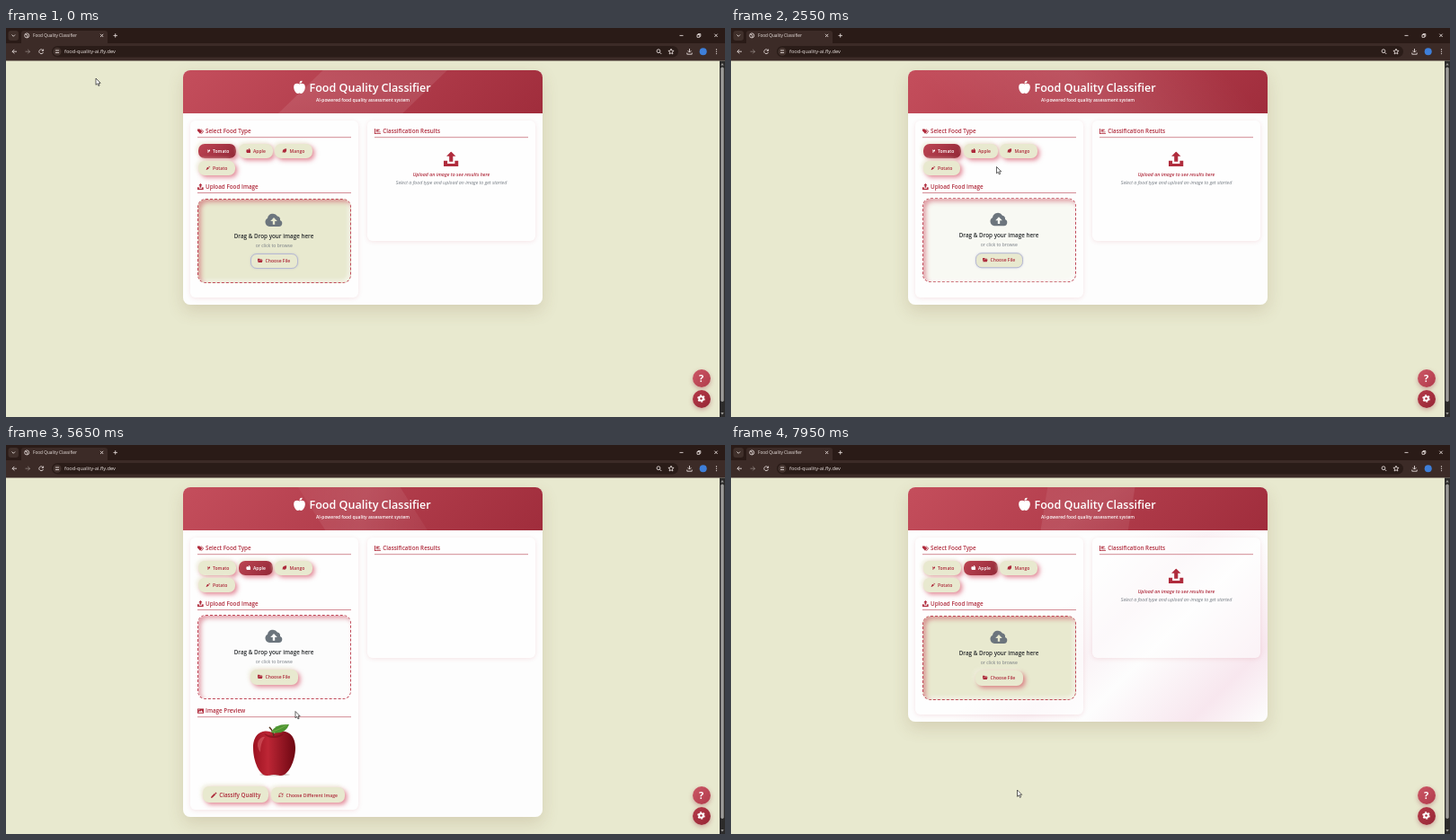
Write an HTML page that moves like this. It is 800 px wide and 433 px high and loops after 8 s.

```html
<!DOCTYPE html>
<html lang="en">
<head>
<meta charset="utf-8">
<title>Food Quality Classifier</title>
<style>
html, body { margin: 0; width: 100%; height: 100%; overflow: hidden; background: #e8e9cf; }
body { position: relative; font: 600 5.05px "Open Sans", "Noto Sans", sans-serif; }
div, .ink { position: absolute; box-sizing: border-box; }
.ink { left: 0; top: 0; width: 800px; height: 433px; overflow: visible; }
#panel { left: 197px; top: 47px; width: 400px; border-radius: 8px; background: #fdfdfd; overflow: hidden; }
#panelShadow { left: 197px; top: 47px; width: 400px; border-radius: 8px; box-shadow: 0 7px 18px rgba(120,85,50,.17); }
#header { left: 0; top: 0; width: 400px; height: 48px; overflow: hidden; background: linear-gradient(135deg, #c44e5c, #a02d3c); }
#shine { left: -200px; top: -24px; width: 800px; height: 96px;
  background: linear-gradient(45deg, transparent 30%, rgba(255,255,255,.1) 50%, transparent 70%); }
#blush { left: 0; top: 48px; width: 400px; bottom: 0;
  background: linear-gradient(135deg, transparent 42%, rgba(235,190,210,.16) 55%, transparent 66%, rgba(235,180,205,.3) 86%, transparent); }
.card { top: 103px; width: 187px; border-radius: 6px; background: rgba(255,255,255,.5); box-shadow: 0 1px 5px rgba(190,60,80,.13); }
.btn { display: flex; align-items: center; justify-content: center; gap: 2.6px; white-space: nowrap;
  color: #ad2a3b; background: #e8e9cf; border-radius: 7px;
  box-shadow: 2.5px 2.5px 5px rgba(205,50,75,.55), -2px -2px 4px rgba(240,240,222,.9); }
.btn svg { width: 5.8px; height: 5.8px; flex: none; }
.btn.on { color: #fff; background: linear-gradient(135deg, #bd4553, #922736); }
.btn.focus { border: 1px solid #b7b9d2; box-shadow: 0 0 2px rgba(150,155,205,.5); }
#drop { left: 213px; top: 189.5px; width: 171px; height: 94px; border-radius: 9px; border: 1.5px dashed #c04a59;
  box-shadow: inset 3px 3px 5px rgba(200,65,85,.48), inset -2px -2px 4px rgba(255,255,255,.65); }
.round { left: 763.5px; width: 20px; height: 20px; border-radius: 50%; box-shadow: 0 2px 5px rgba(150,40,60,.35); }
.red { fill: #b02c3d; color: #b02c3d; }
.head { font-size: 6.3px; }
.mid { text-anchor: middle; }
.bar { fill: #ecedf1; }
.line { fill: none; stroke: #e2d9d6; stroke-width: .9; }
</style>
</head>
<body>
<svg width="0" height="0" style="position:absolute">
  <defs>
    <symbol id="apple" viewBox="0 0 16 16"><path d="M8 4.5C10 3.2 15 3 15 8c0 4-3 8-5 8-1 0-1-.6-2-.6S7 16 6 16C4 16 1 12 1 8c0-5 5-4.8 7-3.5zM8 3.5C8 1 9.500 0 11.500 0c0 2-1 3.500-3.500 3.500z"/></symbol>
    <symbol id="sprout" viewBox="0 0 16 16"><path d="M0 2c5 0 7 2 7 6v6h2v-4c4 0 7-3 7-7-4 0-6 1-7 4C8 4 5 2 0 2z"/></symbol>
    <symbol id="leaf" viewBox="0 0 16 16"><path d="M2 9C2 4 6 2 14 1c1 7-1 12-6 12-2 0-3-.5-4-1l-2 2z"/></symbol>
    <symbol id="carrot" viewBox="0 0 16 16"><path d="M1 15L5 6c3-2 6 1 5 4zM10 5l1-4 1 3h3l-4 3z"/></symbol>
    <symbol id="tags" viewBox="0 0 16 16"><path d="M0 2h6l6 6-5 6-7-7zM8 2l6 6-5 6h2l5-6-6-6z"/></symbol>
    <symbol id="upload" viewBox="0 0 16 16"><path d="M8 0l5 5h-3v6H6V5H3zM0 10h4v3h8v-3h4v6H0z"/></symbol>
    <symbol id="chart" viewBox="0 0 16 16"><path d="M0 1h2v12h14v2H0zM4 3h9v2H4zM4 6h6v2H4zM4 9h11v2H4z"/></symbol>
    <symbol id="folder" viewBox="0 0 16 16"><path d="M0 2h6l2 2h6v2H4l-3 6H0zM4.500 7H16l-3 7H1z"/></symbol>
    <symbol id="image" viewBox="0 0 16 16"><path fill-rule="evenodd" d="M0 2h16v12H0zM2 12h12l-4-6-3 4-2-2zM4 4a1.300 1.300 0 1 0 .1 0z"/></symbol>
    <symbol id="pencil" viewBox="0 0 16 16"><path d="M0 16l1-4 8-8 3 3-8 8zM10 3l2-2 3 3-2 2z"/></symbol>
    <symbol id="sync" viewBox="0 0 16 16"><path d="M2 7a6 6 0 0 1 10.500-3M14 9a6 6 0 0 1-10.500 3" fill="none" stroke="currentColor" stroke-width="2"/><path d="M15 1v6H9zM1 15V9h6z"/></symbol>
    <linearGradient id="skin"><stop stop-color="#9c1220"/><stop offset=".35" stop-color="#bd2635"/><stop offset="1" stop-color="#6d0712"/></linearGradient>
  </defs>
</svg>

<svg class="ink" id="browser">
  <path fill="#2a1b17" d="M0 0h800v18H0z"/>
  <path fill="#3c2b27" d="M0 17h800v19.500H0zM17 17V6q0-3 3-3h90q3 0 3 3v11z"/>
  <rect x="2.500" y="3" width="11.500" height="11" rx="3" fill="#40302b"/>
  <rect x="51" y="20" width="697" height="12.500" rx="6.200" fill="#2a1c18"/>
  <circle cx="57" cy="26.200" r="4.500" fill="#44342f"/>
  <g class="line">
    <path d="M6.500 7.500l1.800 1.800 1.800-1.800M105 6.800l3.200 3.200m0-3.200l-3.200 3.200M119.500 8.400h4.400m-2.200-2.200v4.400"/>
    <circle cx="23.200" cy="8.400" r="2.500"/><path d="M21.500 7l2.500 1.300-.5 2"/>
    <path d="M12 26.200H7m2.300-2.300L7 26.200l2.300 2.300M41.300 25a2.400 2.400 0 1 0 .2 2M41.600 23.600v1.800h-1.800M55 25h4m-4 2.500h4"/>
    <path opacity=".45" d="M21.500 26.200h5m-2.300-2.300l2.300 2.300-2.300 2.300"/>
    <circle cx="726" cy="25.700" r="1.900"/><path d="M727.500 27.200l1.800 1.800"/>
    <path d="M740 23.200l.9 2 2.200.2-1.700 1.400.5 2.200-1.900-1.200-1.900 1.200.5-2.200-1.700-1.400 2.200-.2z"/>
    <path d="M760.500 23v4m-1.900-1.800l1.900 1.900 1.900-1.900M757.800 27.500v1.700h5.400v-1.700"/>
    <path id="controls" d="M749.500 8.400h4M769 7.500h2.800v2.800H769zM770 7.500v-1h2.800v2.800h-1M788.300 6.600l3.400 3.400m0-3.400l-3.400 3.400"/>
  </g>
  <circle cx="775.700" cy="26.200" r="4" fill="#3e7fd9"/>
  <g fill="#e2d9d6"><circle cx="790.500" cy="24" r=".65"/><circle cx="790.500" cy="26.300" r=".65"/><circle cx="790.500" cy="28.600" r=".65"/></g>
  <g fill="#eee6e3" font-weight="400"><text x="30" y="10.200" font-size="4.720">Food Quality Classifier</text><text x="65" y="28.300" font-size="5.700">food-quality-ai.fly.dev</text></g>
  <path fill="#2c2b2a" d="M794 36.500h6V433h-6z"/>
  <rect x="795.300" y="43.500" width="3.400" height="372.500" rx="1.700" fill="#9c9b99"/>
  <path fill="#9c9b99" d="M795.300 41.500h3.400l-1.700-2.500zM795.300 428h3.400l-1.700 2.500z"/>
</svg>

<div id="panelShadow"></div>
<div id="panel">
  <div id="header"><div id="shine"></div></div>
  <div id="blush"></div>
</div>
<div class="card" id="leftCard" style="left:205px"></div>
<div class="card" id="rightCard" style="left:402px"></div>

<svg class="ink">
  <g fill="#fff">
    <use href="#apple" x="319" y="58.500" width="15" height="14.500"/>
    <text x="337.500" y="70.600" font-size="12.550">Food Quality Classifier</text>
    <text class="mid" x="397" y="82.200" font-size="4.930">AI-powered food quality assessment system</text>
  </g>
  <g class="red head">
    <use href="#tags" x="213" y="111.500" width="7" height="7"/><text x="222" y="117.300">Select Food Type</text>
    <use href="#upload" x="213" y="173" width="6.800" height="7"/><text x="222" y="178.900">Upload Food Image</text>
    <use href="#chart" x="410" y="111.500" width="7" height="7"/><text x="419.300" y="117.300">Classification Results</text>
  </g>
  <path stroke="#cf7f89" stroke-width=".9" d="M213 121.700h171M410 121.700h171M213 183.500h171"/>
  <g id="empty">
    <use class="red" href="#upload" x="487" y="137.500" width="16.500" height="16.500"/>
    <g class="mid" font-style="italic" font-size="5.250">
      <text class="red" x="495.500" y="164.500" fill="#b02c3d">Upload an image to see results here</text>
      <text x="495.500" y="174.300" fill="#737a82" font-weight="400">Select a food type and upload an image to get started</text>
    </g>
  </g>
  <g id="skeleton" class="bar">
    <rect x="421" y="138" width="149.500" height="66.500" rx="4"/>
    <rect x="421" y="210" width="89.500" height="6.500" rx="2"/>
    <rect x="421" y="219.300" width="119.500" height="6.500" rx="2"/>
    <rect x="421" y="228.700" width="89.500" height="6.500" rx="2"/>
  </g>
</svg>

<div class="btn" id="tomato" style="left:214px;top:128.500px;width:42px;height:16px"><svg fill="currentColor"><use href="#sprout"/></svg>Tomato</div>
<div class="btn" id="appleChip" style="left:259px;top:128.500px;width:37.500px;height:16px"><svg fill="currentColor"><use href="#apple"/></svg>Apple</div>
<div class="btn" style="left:299px;top:128.500px;width:41.500px;height:16px"><svg fill="currentColor"><use href="#leaf"/></svg>Mango</div>
<div class="btn" style="left:213.500px;top:147.500px;width:41px;height:16px"><svg fill="currentColor"><use href="#carrot"/></svg>Potato</div>

<div id="zone" style="left:0;top:0">
  <div id="drop"></div>
  <svg class="ink">
    <path transform="translate(288 205.500)" fill="#6c757d" fill-rule="evenodd" d="M5 15.500a5 5 0 0 1-2-9.300A6 6 0 0 1 14 4a4 4 0 0 1 3 4.400 3.700 3.700 0 0 1-1.200 7.100zM10 5.500l-3.800 4h2.600v3.700h2.400V9.500h2.600z"/>
    <text class="mid" x="298" y="233.500" font-size="6.300" fill="#25282b">Drag &amp; Drop your image here</text>
    <text class="mid" x="298.300" y="243.800" fill="#757b82" font-weight="400">or click to browse</text>
  </svg>
  <div class="btn" id="choose" style="left:271.500px;top:250.500px;width:53.500px;height:17px"><svg fill="currentColor"><use href="#folder"/></svg>Choose File</div>
</div>

<div id="preview" style="left:0;top:0">
  <svg class="ink">
    <g class="red head"><use href="#image" x="213" y="292.500" width="7" height="7"/><text x="222" y="298.300">Image Preview</text></g>
    <path stroke="#cf7f89" stroke-width=".9" d="M213 302.700h171"/>
    <ellipse cx="299" cy="367" rx="17" ry="1.500" fill="#d8cfcc"/>
    <path fill="url(#skin)" d="M298 321c7-5 24-4 24 16 0 15-8 31-16 31-4 0-5-1-8-1s-4 1-8 1c-8 0-15-16-15-31 0-20 16-21 23-16z"/>
    <path fill="#7c0c18" opacity=".6" d="M287 321q11 6 22 0-3 5-11 5t-11-5z"/>
    <path fill="#df6c72" opacity=".5" d="M281 329q4-5 7-4-5 7-5 17-5-7-2-13z"/>
    <path fill="none" stroke="#57351f" stroke-width="1.500" d="M298 324q-1-6-5-10"/>
    <path fill="#4d9532" d="M295 320q4-10 20-9-4 12-20 9z"/>
    <path fill="none" stroke="#8bbd54" stroke-width=".6" d="M296 319.500q8-3 17-8"/>
  </svg>
  <div class="btn" id="classify" style="left:219px;top:380px;width:73px;height:18px;font-size:6.260px"><svg fill="currentColor" style="width:7px;height:7px"><use href="#pencil"/></svg>Classify Quality</div>
  <div class="btn" id="different" style="left:295px;top:381px;width:82px;height:17px"><svg fill="currentColor"><use href="#sync"/></svg>Choose Different Image</div>
</div>

<div class="round" style="top:379.500px;background:linear-gradient(135deg,#cc5766,#b03b4b)"></div>
<div class="round" style="top:402.500px;background:linear-gradient(135deg,#b53a49,#962636)"></div>
<svg class="ink">
  <text class="mid" x="773.500" y="393.600" font-size="11" font-weight="700" fill="#fff">?</text>
  <g fill="none" stroke="#fff" transform="translate(773.500 412.500)"><circle r="2.300" stroke-width="1.900"/><circle r="3.600" stroke-width="1.400" stroke-dasharray="1.885"/></g>
  <g id="cursor" stroke="#222" stroke-width=".7" stroke-linejoin="round" fill="#fff">
    <path id="arrow" d="M0 0v7.300l1.700-1.500 1.200 2.600 1.200-.5L3 5.300h2.200z"/>
    <path id="hand" d="M-.7.7q.7-1.300 1.400 0v3l3 .6q.9.300.8 1.500L4 8.700H.2L-2.500 5.200q.3-1 1.800.3z"/>
  </g>
</svg>

<script>
const LOOP = 8000;
const el = id => document.getElementById(id);
const clamp = v => Math.max(0, Math.min(1, v));
const smooth = v => (v = clamp(v), v * v * (3 - 2 * v));
const within = (t, ...spans) => spans.some(([a, b]) => t >= a && t < b);
const show = (id, on) => el(id).style.visibility = on ? 'visible' : 'hidden';

// time, x, y of the pointer tip
const path = [
  [0, 100, 56], [100, 100, 56], [880, 351.5, 266.5], [1350, 351.5, 266.5], [2050, 328, 228],
  [2550, 295.5, 154.5], [2720, 279, 137], [2920, 279, 137], [3250, 299, 260], [3480, 299, 260],
  [4150, 235.5, 75.5], [5150, 235.5, 75.5], [5500, 304, 262], [5650, 322, 296.5],
  [6200, 252.5, 383.5], [6800, 252.5, 383.5], [7450, 318.5, 384], [LOOP, 318.5, 384]
];

function pointer(t) {
  const i = path.findIndex(p => p[0] > t);
  const [t0, x0, y0] = path[i - 1], [t1, x1, y1] = path[i];
  const k = smooth((t - t0) / (t1 - t0));
  return [x0 + (x1 - x0) * k, y0 + (y1 - y0) * k];
}

function hoverButton(id, on, lift) {
  el(id).style.color = on ? '#25282b' : '';
  el(id).style.transform = on ? `translateY(${-lift}px)` : '';
}

function render(t) {
  const apple = t >= 2850, away = within(t, [3380, 5450]);
  const preview = within(t, [5480, 7800]), loading = within(t, [6380, 7800]);

  el('shine').style.transform = `rotate(${-44 + t * .018}deg)`;
  el('blush').style.opacity = smooth((t - 7780) / 150);
  el('controls').style.opacity = away ? .4 : 1;
  el('panel').style.height = el('panelShadow').style.height = (preview ? 367 : 260.5) + 'px';
  el('leftCard').style.height = (preview ? 303 : 196.5) + 'px';
  el('rightCard').style.height = (loading ? 153.5 : 133.5) + 'px';
  show('preview', preview);
  show('empty', !preview);
  show('skeleton', loading);
  el('tomato').classList.toggle('on', !apple);
  el('appleChip').classList.toggle('on', apple);
  el('choose').classList.toggle('focus', t < 2850);

  const hovered = within(t, [920, 2460], [3080, 5620]);
  const left = t < 920 ? 1 : smooth((t - (t < 3080 ? 2460 : 5620)) / 300);
  const entered = smooth((t - (t < 3080 ? 920 : 3080)) / 300);
  el('zone').style.transform = `translateY(${hovered ? -entered : left - 1}px)`;
  el('drop').style.background = hovered
    ? 'linear-gradient(135deg, #f5f6f8, #e6e9ed)'
    : `color-mix(in srgb, #e8e9cf ${left * 100}%, #fdfdfd)`;
  el('drop').style.borderColor = hovered ? '#a82c3c' : '#c04a59';

  hoverButton('choose', within(t, [3190, 5580]), 0);
  hoverButton('classify', within(t, [6130, 7020]), 1);
  hoverButton('different', within(t, [7080, 7800]), .5);

  const [x, y] = pointer(t);
  const hand = within(t, [920, 2460], [2640, 3000], [3080, 3700], [6130, 7020], [7080, 7800]);
  el('cursor').setAttribute('transform', `translate(${x} ${y})`);
  show('arrow', !hand);
  show('hand', hand);
}

const start = performance.now();
function tick() {
  render((performance.now() - start) % LOOP);
  requestAnimationFrame(tick);
}
tick();
</script>
</body>
</html>
```
